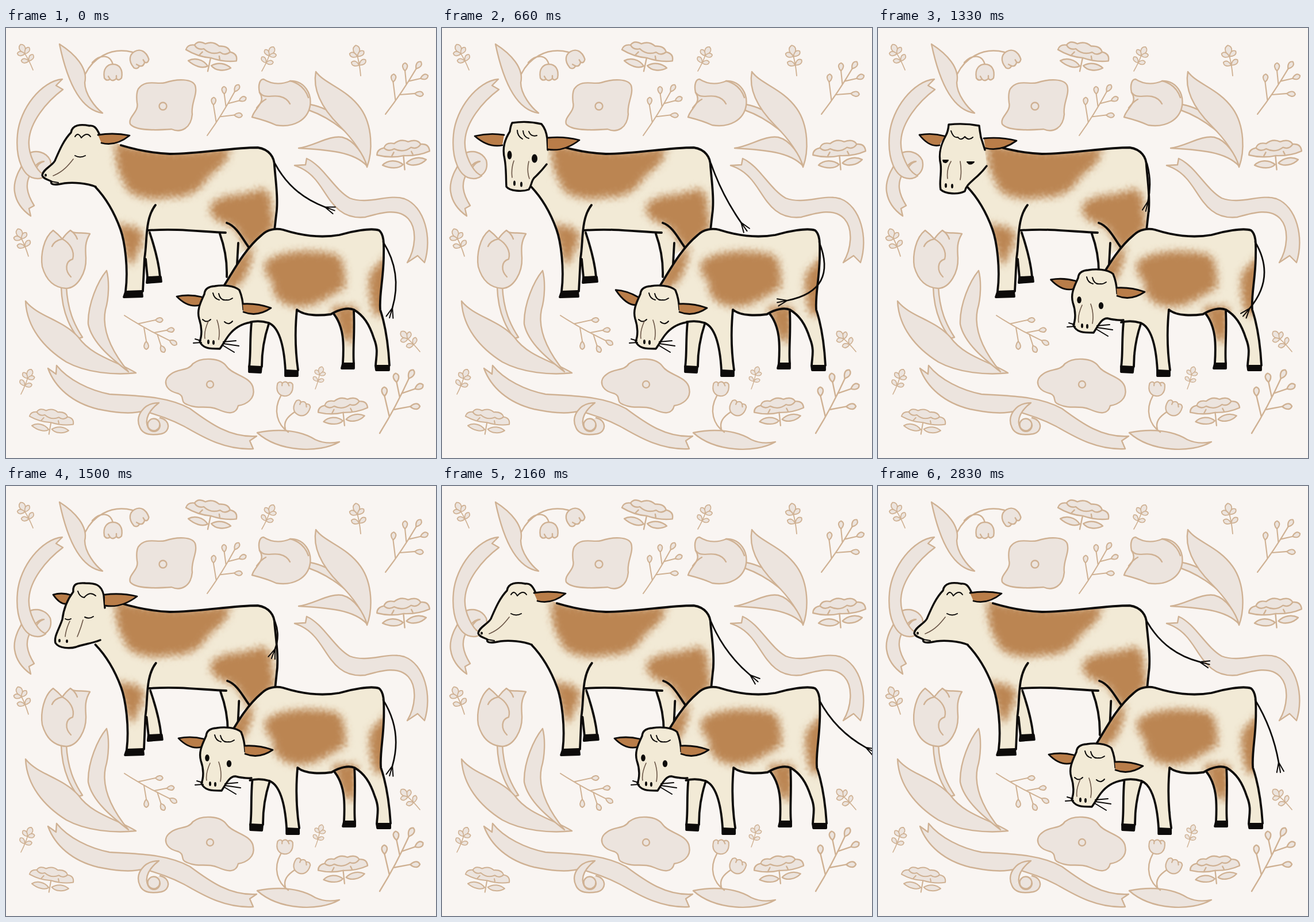
An HTML page for the animation above (3000 ms loop, 748 by 748 pixels).

```html
<!DOCTYPE html>
<html lang="en">
<head>
<meta charset="utf-8">
<title>Two cows</title>
<style>
html, body { margin: 0; width: 100%; height: 100%; overflow: hidden; background: #f9f5f2; }
svg { display: block; width: 100vw; height: 100vh; }
path, ellipse { stroke-linecap: round; stroke-linejoin: round; }
#garden { fill: #ece4de; stroke: #cfb193; stroke-width: 2.4; }
.open { fill: none; }
.cream { fill: #f2ead6; }
.ink { fill: none; stroke: #0d0b0a; stroke-width: 3.8; }
.thin { fill: none; stroke: #0d0b0a; stroke-width: 2; }
.tail { fill: none; stroke: #0d0b0a; stroke-width: 2.7; }
.fine { fill: none; stroke: #6b5647; stroke-width: 1.6; }
.head { fill: #f2ead6; stroke: #0d0b0a; stroke-width: 3.4; }
.ear { fill: #b97d49; stroke: #0d0b0a; stroke-width: 2.8; }
.dark { fill: #0d0b0a; }
.patches { fill: #bb8552; filter: url(#brush); }
</style>
</head>
<body>
<svg viewBox="0 0 748 748">
<defs>
  <filter id="brush" x="-20%" y="-20%" width="140%" height="140%" color-interpolation-filters="sRGB">
    <feGaussianBlur stdDeviation="7" result="soft"/>
    <feTurbulence type="fractalNoise" baseFrequency=".2" numOctaves="3" seed="4"/>
    <feDisplacementMap in="soft" scale="12" xChannelSelector="R" yChannelSelector="G"/>
    <feGaussianBlur stdDeviation=".8"/>
  </filter>
  <clipPath id="skin1"><path id="shape1" d="M152 180C185 200 220 214 285 219C340 219 390 208 440 208C458 211 467 225 467 240C469 265 474 300 470 325L468 352L424 382L403 395L400 434H384C385 405 380 380 372 356C340 352 300 349 250 352C258 380 266 410 268 433H246L242 400L238 460H207C213 420 207 372 199 350C190 325 175 297 155 276Z"/></clipPath>
  <clipPath id="skin2"><path id="shape2" d="M380 447C397 420 415 385 445 360C455 350 470 348 482 351C510 360 545 366 580 360C600 354 635 347 649 352C659 360 657 380 657 400C656 440 649 465 651 490C661 520 665 550 667 589H643C644 570 648 560 640 540C632 515 622 500 605 490C607 530 603 560 605 585H586C588 550 588 520 570 497C550 502 520 501 506 490C503 520 503 560 508 597H486C484 560 478 522 457 513C447 545 445 570 445 590H423C426 570 424 540 427 511L393 506Z"/></clipPath>
</defs>
<g id="garden"></g>
<g id="cow1">
  <use href="#shape1" class="cream"/>
  <g clip-path="url(#skin1)"><g class="patches">
    <path d="M190 198C240 214 320 217 390 208C388 238 364 245 349 264C335 287 310 296 285 294C250 304 208 290 207 272C192 250 190 225 190 198Z"/>
    <path d="M357 306C380 284 420 294 440 280Q456 278 461 300L466 350L424 390C408 362 400 348 388 342C366 338 350 325 357 306Z"/>
    <path d="M192 338C212 347 232 342 239 360C234 385 226 402 217 414C207 395 199 365 192 338Z"/>
  </g></g>
  <path class="ink" d="M200 204C230 213 260 218 285 219C340 219 390 208 438 208C458 211 467 225 467 240C469 265 474 300 470 325L467 352M155 276C175 297 190 325 199 350C207 372 213 420 208 458M260 308C241 332 246 372 241 400L238 458M248 352C300 348 345 355 382 356M250 356C258 380 266 410 268 433M243 402L246 433M384 339C402 345 412 368 422 381M372 358C380 380 385 405 384 433M404 374L402 410"/>
  <path class="dark ink" d="M208 459L236 458L237 467L205 468ZM246 434L269 433L270 441L245 443Z"/>
</g>
<g id="tail1"></g>
<g id="head1"></g>
<g id="cow2">
  <use href="#shape2" class="cream"/>
  <g clip-path="url(#skin2)"><g class="patches">
    <path d="M453 406C475 388 525 384 572 393C594 405 588 430 590 452C565 463 548 482 512 485C478 483 462 468 464 442C452 430 446 420 453 406Z"/>
    <path d="M634 425L668 390V500H642Q626 460 634 425Z"/>
    <path d="M430 375C430 400 420 440 398 452L370 460L395 410Z"/>
    <path d="M566 484H610V525L602 550L585 538Z"/>
  </g></g>
  <path class="ink" d="M380 447C397 420 415 385 445 360C455 350 470 348 482 351C510 360 545 366 580 360C600 354 635 347 649 352C659 360 657 380 657 400C656 440 649 465 651 490C661 520 665 550 667 587M605 490C622 500 632 515 640 540C648 560 644 570 643 587M605 492C607 530 603 560 605 583M570 497C588 520 588 550 586 583M506 490C520 502 550 500 565 498C580 489 595 486 605 490M506 490C503 520 503 560 508 595M457 513C478 522 484 560 486 595M457 515C447 545 445 570 445 589M427 513C424 540 426 570 423 589M423 512Q440 508 457 513"/>
  <path class="dark ink" d="M423 589L444 590L443 599L423 598ZM486 596L507 597L507 605L486 605ZM586 584L605 584L605 592L584 592ZM643 588L666 588L666 595L644 595Z"/>
</g>
<g id="tail2"></g>
<g id="head2"></g>
</svg>
<script>
const $ = id => document.getElementById(id);
const path = (d, cls = '') => `<path class="${cls}" d="${d}"/>`;
const dot = (x, y, rx, ry = rx, cls = '') => `<ellipse class="${cls}" cx="${x}" cy="${y}" rx="${rx}" ry="${ry}"/>`;
const place = (x, y, turn, scale, body) => `<g transform="translate(${x} ${y}) rotate(${turn}) scale(${scale})">${body}</g>`;
const clamp = v => Math.max(0, Math.min(1, v));

// ---- Static garden ----
const leaf = (x, y, turn, len, w) =>
  place(x, y, turn, 1, path(`M0 0C${w * .5} ${-len * .3} ${w * .8} ${-len * .8} 0 ${-len}C${-w * .8} ${-len * .8} ${-w * .5} ${-len * .3} 0 0Z`));

const sprig = '<g stroke-width="1.8">' + path('M0 0Q1 -20 -1 -34', 'open') +
  leaf(-1, -34, 0, 18, 11) + [-62, 58].map(turn => leaf(-1, -33, turn, 14, 8) + leaf(0, -18, turn, 14, 8)).join('') + '</g>';

const twig = '<g stroke-width="2">' +
  path('M0 0Q3 -45 0 -92M1 -28L-20 -52M2 -40L22 -56M1 -60L-14 -78M1 -66L16 -82', 'open') +
  leaf(0, -90, 0, 14, 8) + leaf(-19, -51, -30, 13, 8) + leaf(21, -55, 60, 14, 8) +
  leaf(-13, -77, -35, 13, 8) + leaf(15, -81, 35, 13, 8) + '</g>';

const umbel =
  path('M-2 20C-12 10 -28 10 -37 18C-25 25 -10 27 -2 20ZM4 18C14 9 28 9 38 15C28 24 12 25 4 18Z') +
  path('M0 4V29', 'open') +
  path('M-45 0Q-44 -10 -32 -11Q-28 -21 -14 -17Q-2 -25 10 -18Q26 -22 31 -12Q45 -12 45 1Q25 8 0 5Q-22 8 -45 0Z') +
  path('M-32 -11Q-25 -3 -15 -8Q0 1 14 -8Q24 -3 31 -12M-20 4L-16 -2M16 4L14 -1', 'open');

const bell =
  path('M-15 9C-18 -8 -9 -15 0 -15C11 -15 18 -6 15 9Q10 15 6 10Q0 16 -5 11Q-11 15 -15 9Z') +
  path('M-8 6L-5 11M6 5V10', 'open');

$('garden').innerHTML = [
  // Lily of the valley
  path('M93 28C120 45 143 70 137 95C137 115 155 138 168 148C132 143 108 100 93 28Z'),
  path('M138 80C150 55 180 32 220 42M150 60C165 44 182 47 186 64', 'open'),
  place(186, 78, 0, 1, bell), place(231, 54, -30, 1, bell),
  path('M437 704C480 695 515 702 538 716C555 724 570 722 580 720C545 740 475 738 437 704Z'),
  path('M491 703C472 690 464 665 478 640M486 698C482 685 490 676 502 668', 'open'),
  place(485, 627, 185, .88, bell), place(514, 661, 205, .88, bell),
  // Flat blossoms
  path('M230 106C243 88 262 99 277 95C298 88 324 88 329 100C334 115 321 132 324 150C322 174 305 183 288 176C260 178 225 179 216 167C212 154 232 146 228 130Q226 114 230 106Z'),
  dot(273, 136, 6.5),
  path('M287 602C300 592 317 597 325 584C340 572 373 573 384 589C394 604 427 606 430 627C434 645 418 655 404 657C400 673 386 671 370 664C350 655 335 664 315 655C302 651 312 641 300 636C275 630 272 612 287 602Z'),
  dot(355, 620, 6),
  // Tulips
  path('M529 133C570 140 600 172 629 208L628 220C605 190 570 158 527 143Z'),
  path('M539 76C555 98 592 105 617 140C638 170 638 215 628 242C620 215 600 190 580 170C550 140 533 108 539 76Z'),
  path('M509 209C535 206 562 186 585 190C608 196 622 222 628 240C605 215 560 212 509 209Z'),
  path('M428 155C433 138 453 130 441 112C438 98 442 89 448 89C462 98 478 99 495 92C520 92 532 115 529 135C525 160 500 174 470 169C455 162 440 158 428 155Z'),
  path('M441 112C450 124 462 116 476 119Q489 122 494 132M494 92Q518 98 526 121M436 139Q444 128 452 124', 'open'),
  path('M96 450C97 490 110 520 126 540L133 538C118 515 107 490 105 450Z'),
  path('M34 475C55 502 100 508 126 538C150 572 195 580 226 600C188 604 140 600 105 581C65 556 36 520 34 475Z'),
  path('M175 422C160 440 142 480 143 515C150 550 190 580 213 598C190 570 165 530 173 490C179 470 180 440 175 422Z'),
  path('M82 352C65 365 60 395 63 415C70 440 85 452 105 453C125 452 140 425 139 400C138 385 137 372 146 358C130 354 120 360 112 352Q104 358 98 367Q90 358 82 352Z'),
  path('M98 367C111 374 120 388 116 402C103 406 102 422 113 433M112 352Q121 358 124 367M80 380Q84 370 98 367', 'open'),
  // Ribbons
  path('M48 217C25 235 12 265 15 285C18 305 30 318 43 327L40 314L49 309C36 288 32 270 44 252C50 240 55 233 66 232Z'),
  path('M36 220C52 210 70 216 77 230C81 246 72 259 58 258C47 253 52 236 66 232'),
  path('M98 89C62 92 24 140 20 185C16 228 30 262 55 262Q63 262 69 257C52 250 38 218 40 195C42 165 68 130 99 107L87 100Z'),
  path('M523 227C552 240 570 280 598 296C630 308 665 288 693 297C728 310 742 365 728 408L716 396L698 408C712 385 716 350 700 332C682 312 650 322 625 329C570 335 560 285 535 260C525 249 514 243 502 239L521 238Z'),
  path('M88 587C108 612 145 630 180 637C230 640 280 640 320 662C355 688 390 713 436 710L424 718L430 732C380 735 340 710 310 693C285 680 262 673 240 666C215 673 185 668 160 663C115 652 85 625 73 592L87 602Z'),
  path('M233 695C223 675 240 652 266 652C250 664 240 680 247 695C252 706 267 703 268 692C266 680 252 680 246 688M268 678C286 682 287 702 270 706C253 709 238 707 233 695'),
  dot(257, 690, 10.5),
  // Small repeats
  place(357, 47, 12, 1, umbel), place(691, 217, -5, 1.02, umbel),
  place(79, 682, 10, .86, umbel), place(586, 664, -6, .96, umbel),
  place(47, 73, -25, .95, sprig), place(445, 75, 27, .9, sprig), place(617, 83, -8, 1.03, sprig),
  place(39, 397, -20, .98, sprig), place(26, 637, 24, .9, sprig), place(538, 628, 18, .78, sprig),
  place(720, 563, -42, .92, sprig),
  place(350, 187, 32, 1, twig), place(660, 150, 34, 1.06, twig),
  place(650, 705, 28, 1.2, twig), place(206, 500, 119, 1, twig)
].join('');

// ---- Moving parts ----
// Ear between two base points and a tip, with a full lower edge.
const ear = (x1, y1, x2, y2, [tx, ty]) => path(
  `M${x1} ${y1}Q${(x1 + tx) / 2} ${(y1 + ty) / 2 - 5} ${tx} ${ty}` +
  `Q${(x2 + tx) / 2} ${(y2 + ty) / 2 + 13} ${x2} ${y2}`, 'ear');

// Tail hanging from (x, y) at an angle from vertical, bowed sideways, ending in three hairs.
function tail(x, y, length, degrees, bow) {
  const a = degrees * Math.PI / 180, sin = Math.sin(a), cos = Math.cos(a);
  const ex = x + length * sin, ey = y + length * cos;
  const cx = (x + ex) / 2 - bow * cos, cy = (y + ey) / 2 + bow * sin;
  const end = Math.atan2(ey - cy, ex - cx);
  const hairs = [-.35, 0, .35].map(fan =>
    `M${ex} ${ey}l${18 * Math.cos(end + fan)} ${18 * Math.sin(end + fan)}`).join('');
  return path(`M${x} ${y}Q${cx} ${cy} ${ex} ${ey}`, 'tail') + path(hairs, 'thin');
}

const turnOf = (step, peak) => 2 * Math.PI * (step - peak) / 18;

// Swings out, then lingers tucked behind the rump, where it looks shorter.
function firstTail(step) {
  const turn = turnOf(step, 16);
  const swing = Math.cos(turn - .35 * (1 - Math.cos(turn)));
  const length = 115 * (1 - .6 * ((1 - swing) / 2) ** 12);
  return tail(468, 236, length, 27 + 27 * swing, 8 + 17 * swing);
}

function secondTail(step) {
  const swing = Math.cos(turnOf(step, 13.5));
  return tail(656, 372, 116, 8 + 37 * swing, -26 + 44 * swing);
}

const firstHead = {
  profile: () =>
    path('M163 186C157 172 152 169 145 170C130 167 115 168 113 182C100 195 92 215 85 231C80 240 64 246 63 256C64 262 72 263 79 267C76 275 92 272 102 270C118 268 140 270 156 276', 'head') +
    path('M120 189Q125 180 131 191Q141 180 147 189M120 222Q129 227 138 222M79 267L91 269', 'thin') +
    path('M82 257C100 250 110 237 117 228', 'fine') + dot(69, 256, 2, 2.5, 'dark') +
    ear(160, 186, 166, 200, [215, 187]),
  turning: () =>
    ear(114, 190, 110, 204, [82, 189]) +
    path('M172 212L170 190C166 171 155 169 138 169C122 168 116 171 117 184C105 200 100 215 98 232C92 250 83 262 86 273C92 283 112 283 122 280C135 275 150 274 164 268', 'head') +
    path('M125 183Q128 193 136 194Q146 182 156 191M103 231Q108 234 113 231M137 228Q145 232 152 227', 'thin') +
    path('M111 235Q104 250 103 262M134 233Q130 248 124 262', 'fine') +
    dot(93, 269, 2, 3, 'dark') + dot(106, 270, 2, 3, 'dark') +
    ear(172, 189, 172, 208, [228, 192]),
  sleepy: () =>
    ear(116, 188, 107, 204, [72, 186]) +
    path('M186 212L179 190Q177 179 176 170Q150 165 123 168Q122 180 118 187C108 205 105 220 109 237C111 255 106 268 109 281C117 289 140 290 151 284C153 274 162 268 168 262Q180 252 189 240', 'head') +
    path('M127 179Q131 192 139 190Q144 197 151 189Q158 197 165 190', 'thin') +
    path('M113 230H122Q119 236 114 233ZM155 233H167Q162 238 158 236Z', 'dark thin') +
    path('M127 232Q119 245 121 262M143 232Q146 250 143 264', 'fine') +
    dot(118, 274, 2, 4, 'dark') + dot(129, 275, 2, 4, 'dark') +
    ear(184, 192, 187, 209, [241, 196]),
  awake: flick =>
    ear(108, 186, 105, 204, [57 + 10 * flick, 188 - 17 * flick]) +
    path('M184 212L183 192Q181 176 173 167Q148 161 122 165Q119 171 118 180C110 193 104 208 109 228C112 245 111 260 112 276C118 284 140 285 151 281C156 274 155 267 160 261Q172 250 182 237', 'head') +
    path('M131 178Q131 188 140 193M141 179Q142 190 151 192M151 180Q155 190 165 187', 'thin') +
    dot(117.5, 221, 4, 7.5, 'dark') + dot(161, 227, 5, 7.5, 'dark') +
    path('M125 231Q120 245 122 260M151 232Q147 248 152 262', 'fine') +
    dot(126, 270, 2, 4.5, 'dark') + dot(138, 272, 2, 4.5, 'dark') +
    ear(184, 191, 184, 211, [239 - 3 * flick, 195 - 8 * flick])
};

// Turns to the viewer around step 5 and back again; one ear flick on the way.
function firstHeadAt(step) {
  const away = Math.abs(step - 5);
  if (away <= 2) return firstHead.awake(clamp(1 - Math.abs(step - 6)));
  if (away === 3) return firstHead.sleepy();
  return away === 4 ? firstHead.turning() : firstHead.profile();
}

// The grazing head rises for the middle of the loop; its left ear perks up as it does.
function secondHeadAt(step) {
  const lift = clamp(Math.min(step - 4, 17 - step) / 2);
  const perk = Math.exp(-(((step - 5.3) / 1.6) ** 2));
  const raised = lift === 1;
  const jaw = raised ? 'C381 544 386 533 396 533Q412 537 424 536' : 'C378 550 381 543 388 534Q402 516 425 512';
  const eyes = raised
    ? dot(347, 501, 3.8, 6, 'dark') + dot(385, 511, 4.2, 6, 'dark')
    : path('M342 507Q349 514 356 507M380 511Q387 518 394 510', 'thin');
  return place(3 * lift, -28 * lift, 0, 1,
    ear(341, 468, 337, 482, [297 + 10 * perk, 467 - 22 * perk]) +
    path(`M413 490Q412 470 406 456C396 447 375 447 363 449Q346 450 345 463C337 480 332 492 336 506C341 520 341 535 337 545C342 558 355 558 372 558${jaw}`, 'head') +
    path('M360 461Q362 471 371 473M370 462Q373 475 384 473Q388 474 394 470', 'thin') + eyes +
    path('M352 510Q344 528 346 540M367 508Q373 525 370 542', 'fine') +
    dot(352, 546, 2, 4, 'dark') + dot(361, 547, 2, 4, 'dark') +
    path('M326 548L340 547M329 541L339 544M378 546L400 544M378 549L405 553M377 552L397 564', 'thin') +
    ear(412, 480, 413, 494, [461, 487]));
}

// Every other drawing leans the legs slightly, with the back line held still.
const lean = (id, backY, slope) => $(id).setAttribute('transform', `matrix(1 0 ${slope} 1 ${-slope * backY} 0)`);

function draw(step) {
  lean('cow1', 210, step % 2 * .008);
  lean('cow2', 360, step % 2 * .009);
  $('tail1').innerHTML = firstTail(step);
  $('head1').innerHTML = firstHeadAt(step);
  $('tail2').innerHTML = secondTail(step);
  $('head2').innerHTML = secondHeadAt(step);
}

// 18 drawings in 3 s, each change falling on a whole hundredth of a second.
let shown = -1;
function tick() {
  const hundredths = Math.floor(performance.now() % 3000 / 10);
  const step = Math.ceil(3 * (hundredths + 1) / 50) - 1;
  if (step !== shown) draw(shown = step);
  requestAnimationFrame(tick);
}
tick();
</script>
</body>
</html>
```
